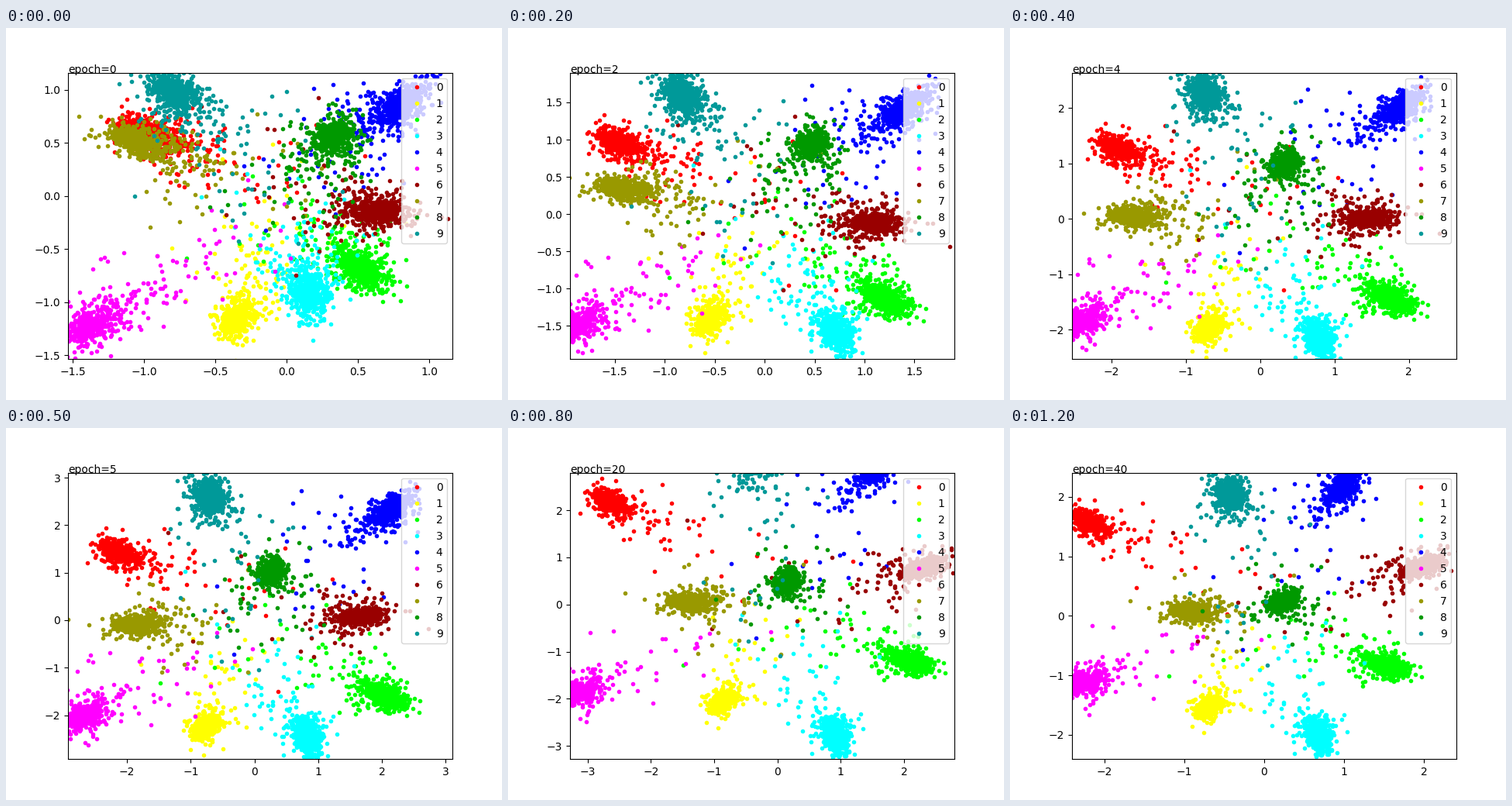
A matplotlib script for the animation above (1.3 s loop, 640 px wide and 480 px high).

```python
import numpy as np
import matplotlib.pyplot as plt
from matplotlib.animation import FuncAnimation

EPOCHS = [*range(6), *range(10, 45, 5)]
PATH_KEYS = [0, 1, 5, 8, 12]
LIMIT_KEYS = [0, 1, 3, 5, 8, 10, 12]
LOW = [-1.535, -1.758, -2.135, -2.924, -3.28, -2.831, -2.408]
HIGH = [1.163, 1.624, 2.175, 3.105, 2.797, 2.665, 2.408]
POINTS = 700


class Cluster:
    """A dense core stretched along its radius, with a tail towards the origin."""

    def __init__(self, label, color, size, path):
        rng = np.random.default_rng(40 + label)
        self.path = np.transpose(path)
        self.size = size
        self.rank = rng.random((POINTS, 1))
        self.core = rng.normal(size=(POINTS, 2)) * rng.lognormal(0, 0.35, (POINTS, 1))
        self.pull = rng.exponential(0.24, (POINTS, 1)).clip(0, 1.1)
        self.noise = rng.normal(size=(POINTS, 2))
        self.line, = ax.plot([], [], ".", c=color, label=str(label))

    def place(self, frame, span):
        center = np.array([np.interp(frame, PATH_KEYS, p) for p in self.path])
        out = center / np.hypot(*center)
        radial = np.array([out, [-out[1], out[0]]])
        fade = np.exp(-frame / 3)
        scale = span * self.size * (1 + 0.5 * fade)
        core = self.core * [0.023 * scale, 0.013 * scale] @ radial
        tail = self.noise * span * (0.028 + 0.11 * self.pull) - self.pull * center
        share = 0.1 + 0.18 * fade
        return center + np.where(self.rank < share, tail, core)


fig, ax = plt.subplots(figsize=(6.4, 4.8), dpi=100)

clusters = [
    Cluster(0, "#ff0000", 0.95,
            [(-0.99, 0.60), (-1.23, 0.80), (-2.13, 1.42), (-2.64, 2.17), (-2.19, 1.57)]),
    Cluster(1, "#ffff00", 0.75,
            [(-0.37, -1.18), (-0.50, -1.15), (-0.79, -2.25), (-0.89, -2.06), (-0.71, -1.53)]),
    Cluster(2, "#00ff00", 1.1,
            [(0.53, -0.69), (0.94, -0.99), (2.04, -1.58), (2.09, -1.19), (1.53, -0.83)]),
    Cluster(3, "#00ffff", 1.1,
            [(0.16, -0.92), (0.68, -1.29), (0.83, -2.43), (0.92, -2.77), (0.68, -1.99)]),
    Cluster(4, "#0000ff", 1.15,
            [(0.80, 0.87), (1.16, 1.13), (2.13, 2.32), (1.56, 2.92), (0.99, 2.19)]),
    Cluster(5, "#ff00ff", 1.0,
            [(-1.40, -1.24), (-1.64, -1.33), (-2.71, -2.04), (-3.18, -1.88), (-2.29, -1.13)]),
    Cluster(6, "#990000", 1.0,
            [(0.65, -0.15), (0.92, -0.19), (1.66, 0.08), (2.30, 0.78), (1.97, 0.83)]),
    Cluster(7, "#999900", 1.0,
            [(-1.07, 0.53), (-1.30, 0.49), (-1.87, -0.10), (-1.41, 0.05), (-0.92, 0.07)]),
    Cluster(8, "#009900", 0.8,
            [(0.34, 0.58), (0.55, 0.92), (0.27, 1.04), (0.16, 0.49), (0.25, 0.25)]),
    Cluster(9, "#009999", 1.15,
            [(-0.81, 1.00), (-0.87, 1.28), (-0.71, 2.61), (-0.44, 3.10), (-0.43, 2.05)]),
]
ax.legend(loc="upper right")
title = ax.text(0, 0, "")


def update(frame):
    low, high = (np.interp(frame, LIMIT_KEYS, v) for v in (LOW, HIGH))
    ax.set(xlim=(low, high), ylim=(low, high))
    for cluster in clusters:
        cluster.line.set_data(*cluster.place(frame, high - low).T)
    title.set_position((low, high))
    title.set_text(f"epoch={EPOCHS[frame]}")
    return [title, *(c.line for c in clusters)]


anim = FuncAnimation(fig, update, frames=len(EPOCHS), interval=100,
                     repeat=True, repeat_delay=0)
plt.show()
```
